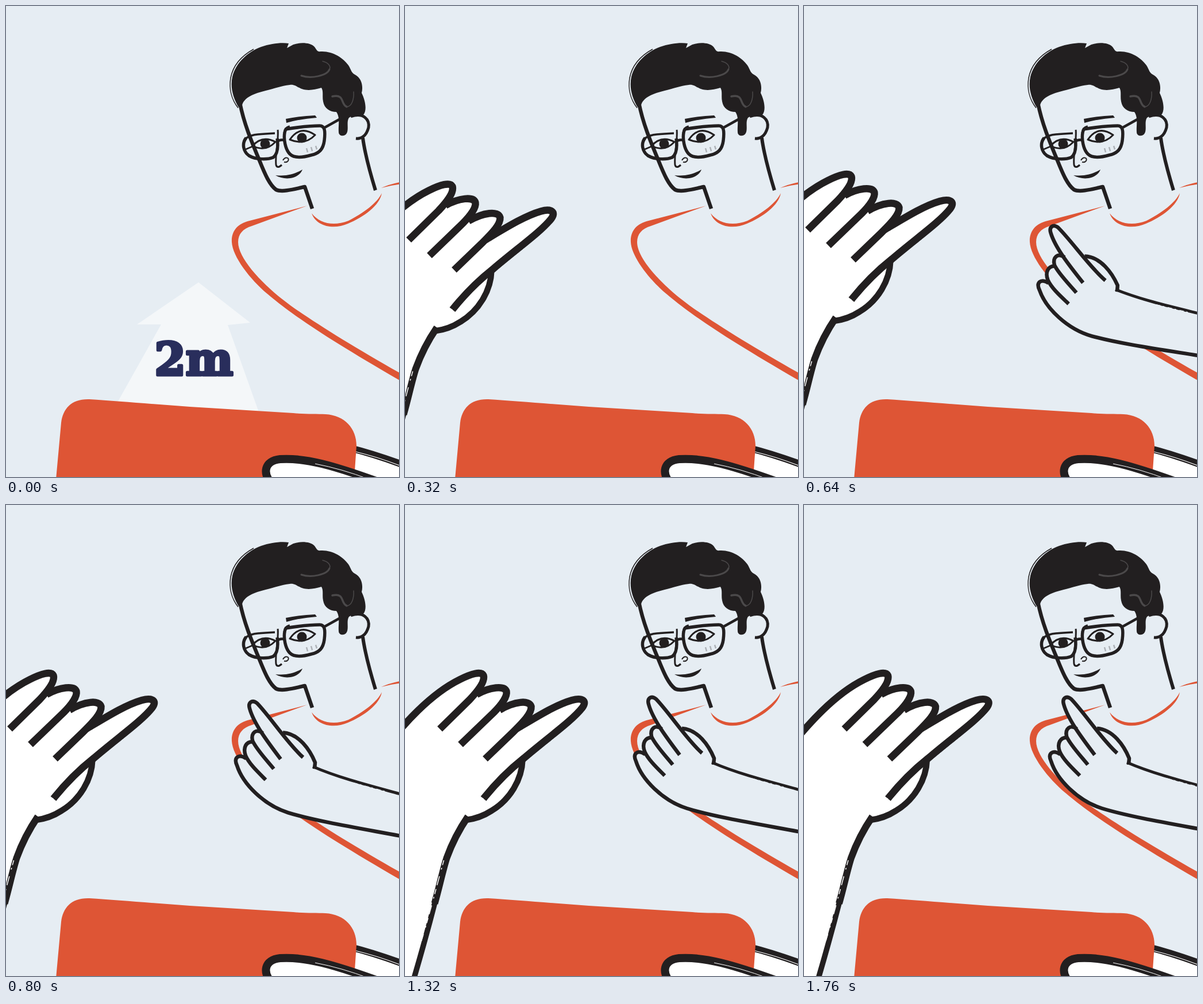
Recreate the animation shown at these times as an HTML page. Size 684 by 818 pixels, loop 1.8 s.

```html
<!DOCTYPE html>
<html lang="en">
<head>
<meta charset="utf-8">
<title>Keep two metres apart</title>
<style>
  html, body { margin: 0; width: 100%; height: 100%; overflow: hidden; background: #e6edf3; }
  svg { display: block; width: 100%; height: 100%; }
  .ink { fill: none; stroke: #221f20; stroke-linejoin: round; }
  .solid { fill: #221f20; }
  .red { fill: #de5535; }
  .skin { fill: #e6edf3; }
  .white { fill: #fff; }
  .fleck { fill: none; stroke: #fff; }
  .gray { fill: none; stroke: #4b494a; stroke-linecap: round; }
  .big { font: bold 78px "DejaVu Serif", serif; fill: #292e5c; stroke: #292e5c; stroke-width: 5; stroke-linejoin: round; }
</style>
</head>
<body>
<svg viewBox="0 0 684 818">
  <rect class="skin" width="684" height="818"/>

  <!-- shirt -->
  <g class="red">
    <path d="M524 347L420 374C400 380 392 394 393 410C394 435 425 475 455 500C500 538 560 578 690 653V640C610 595 540 552 495 520C450 487 404 440 404 410C404 396 412 387 428 382Z"/>
    <path d="M532 360C540 383 570 389 595 378C622 367 651 346 654 325C647 341 622 360 596 373C570 383 546 378 532 360Z"/>
    <path d="M653 316Q668 309 690 305V309Q670 311 653 316Z"/>
  </g>

  <!-- head -->
  <path class="ink" stroke-width="6.500" d="M407 168C414 204 428 237 441 268C451 293 459 311 470 319C480 324 502 318 520 314L533 352"/>
  <path class="ink" stroke-width="6" d="M621 229C624 252 632 284 643 320"/>
  <path class="skin" d="M598 194C624 184 633 201 631 212C627 228 617 233 609 230Z"/>
  <path class="ink" stroke-width="5" d="M600 192C623 184 633 198 631 211C627 226 618 231 609 230"/>
  <path class="solid" d="M405 176C395 159 390 141 394 123C400 99 420 80 444 71C461 65 480 63 492 65L489 73L500 67C512 63 529 63 537 71C541 76 541 80 548 79C568 78 587 90 596 103C601 111 601 116 607 119C619 125 622 139 619 151C625 163 629 181 622 189C615 194 605 188 597 194C592 201 597 214 593 221C589 228 579 226 579 219C578 209 582 194 575 184C564 184 554 178 552 166C550 157 553 148 549 142C537 145 527 148 515 144C506 141 503 136 494 137C478 139 469 143 452 147C432 152 415 158 411 172Z"/>
  <path class="ink" stroke-width="1.500" d="M404 177C392 162 388 143 391 125C395 104 409 87 431 75"/>
  <path class="gray" stroke-width="3" d="M514 121C531 127 559 121 563 110"/>
  <path class="gray" stroke-width="1.5" d="M563 110C566 104 560 98 551 96"/>
  <path class="gray" stroke-width="3.5" d="M568 157C590 152 582 171 593 175"/>
  <path class="gray" stroke-width="1.5" d="M593 175C602 175 606 161 605 149"/>

  <!-- face -->
  <path class="solid" d="M487 196Q512 191 538 190L541 194Q512 196 488 203Z"/>
  <g class="ink" stroke-width="5.500">
    <path d="M486 214C505 211 530 208 546 208C555 208 556 217 554 234C552 248 546 256 531 259C517 263 502 265 494 257C486 249 483 231 485 220Q486 212 494 210"/>
    <path d="M418 229C410 239 413 253 423 260C435 267 455 267 465 263C473 257 474 244 472 230"/>
    <path stroke-width="3.500" d="M417 230Q426 224 438 223T468 221"/>
    <path stroke-width="4.500" d="M471 236Q477 231 485 233M553 212L580 197"/>
    <path stroke-width="3" d="M473 215C475 232 468 257 470 276Q472 283 480 276"/>
    <path stroke-width="2" d="M482 268C486 261 494 263 491 269Q489 272 484 271"/>
    <path stroke-width="3" d="M494 232Q512 206 538 224Q520 243 494 232ZM429 243Q446 224 469 236Q452 254 429 243Z"/>
    <path stroke-width="2.5" d="M417 249L431 243"/>
  </g>
  <circle class="solid" cx="515" cy="229" r="8.5"/>
  <circle class="solid" cx="451" cy="239.500" r="8.500"/>
  <path class="solid" d="M469 294C489 296 503 292 516 284C510 300 486 304 469 294Z"/>
  <path fill="none" stroke="#aeb2b7" stroke-width="2.500" d="M523 247L525 254M531 245L533 252M539 243L541 249"/>

  <!-- distance sign -->
  <path id="arrow" class="white" d="M335 480L425 550L386 554L441 708L193 690L270 553H228Z"/>
  <g id="label"><text class="big" x="327" y="641" text-anchor="middle">2m</text></g>

  <!-- near hand -->
  <g id="near">
    <path class="white" d="M-200 700L-40 440C10 375 60 325 105 303C125 293 142 288 146 296C149 303 142 315 138 326C160 315 182 314 186 324C188 331 183 340 178 352C200 341 225 338 229 350C230 361 216 375 209 385C240 367 272 347 300 339C318 334 327 340 318 352C300 375 258 407 216 444C214 475 192 512 160 531Q140 543 118 545C106 562 91 588 82 613C70 653 50 735 25 822L0 900H-200Z"/>
    <g class="ink" stroke-width="12.500">
      <path d="M-60 466C10 371 60 325 105 303C125 293 142 288 146 296C149 306 137 322 122 338L70 389"/>
      <path d="M134 329C157 316 183 313 186 324C188 335 172 353 157 367L106 416"/>
      <path d="M174 356C200 341 226 338 229 350C230 362 215 377 198 394L149 441"/>
      <path d="M203 389C240 367 272 347 300 339C318 334 327 340 318 352C300 375 258 404 216 440Q178 470 146 510"/>
      <path stroke-width="10.500" d="M214 442C213 477 192 512 160 531Q140 544 116 547"/>
      <path stroke-width="12" d="M119 541C106 560 91 588 82 613C75 635 69 664 61 692"/>
      <path stroke-width="9.500" d="M62 688C52 727 40 771 25 822L5 890"/>
    </g>
    <path class="fleck" stroke-width="5" stroke-dasharray="5 2 9 3" d="M121 534Q136 527 145 507"/>
    <path class="fleck" stroke-width="1.500" stroke-dasharray="9 5 3 12 16 7" d="M77 617C65 660 52 712 38 757"/>
    <path fill="none" stroke="#e6edf3" stroke-width="1.500" stroke-dasharray="2 5 4 3" d="M220 454C218 482 198 515 167 534M226 441L274 402"/>
  </g>

  <!-- far hand -->
  <g id="far">
    <path class="skin" d="M900 545L684 494C640 482 580 465 539 449C537 425 515 388 482 389C466 370 449 349 437 337C428 330 421 336 424 346C429 363 437 373 443 387C434 382 427 389 429 403C418 404 413 414 417 432C405 424 396 431 402 445C412 477 449 514 491 527C540 542 620 555 684 567L900 605Z"/>
    <g class="ink" stroke-width="6.500">
      <path d="M517 431C490 407 461 362 437 337C428 330 421 336 424 346C431 372 456 405 478 434"/>
      <path d="M447 389C435 380 426 389 429 402C435 416 452 434 466 451"/>
      <path d="M430 404C418 403 412 414 417 428C423 442 438 456 452 470"/>
      <path d="M418 433C404 424 396 432 402 445C412 477 449 514 491 527C540 542 620 555 684 567L900 605"/>
      <path d="M482 388C510 390 529 418 538 440L537 451"/>
      <path stroke-width="5" d="M534 447C580 467 640 482 684 494L900 545"/>
    </g>
    <path fill="none" stroke="#e6edf3" stroke-width="1.200" stroke-dasharray="8 4 3 6" d="M604 475L660 490"/>
  </g>

  <!-- phone and fingers -->
  <path class="white" d="M600 770L690 796V830H600Z"/>
  <path class="ink" stroke-width="12" d="M600 768Q640 778 692 797"/>
  <path class="fleck" stroke-width="1.200" d="M608 774Q650 784 690 800"/>
  <path class="red" d="M87 822L96 724C99 699 114 682 145 683C195 686 260 692 320 696L500 707C520 709 540 708 556 709C590 711 610 734 610 764L606 822Z"/>
  <path class="white" d="M463 830C446 812 449 790 477 787C520 784 570 798 650 827Z"/>
  <path class="ink" stroke-width="14" d="M463 830C446 812 449 790 477 787C520 784 570 798 650 827"/>
  <path class="fleck" stroke-width="1" d="M538 795Q585 804 632 822"/>
</svg>
<script>
const LOOP = 1800, STEP = 40;
const el = id => document.getElementById(id);
const [arrow, label, near, far] = ["arrow", "label", "near", "far"].map(el);

const part = (t, a, b) => Math.min(1, Math.max(0, (t - a) / (b - a)));
const left = (t, a, b, power) => (1 - part(t, a, b)) ** power;
const inOut = (t, a, b) => {
  const p = part(t, a, b);
  return p < 0.5 ? 4 * p ** 3 : 1 - 4 * (1 - p) ** 3;
};

function pose(node, dx, dy, angle, px, py, shown) {
  node.setAttribute("transform", `translate(${dx} ${dy}) rotate(${angle} ${px} ${py})`);
  node.setAttribute("visibility", shown ? "visible" : "hidden");
}

function draw(t) {
  arrow.setAttribute("opacity", 0.56 * left(t, 0, 220, 1));
  label.setAttribute("opacity", left(t, 0, 152, 1));
  const size = 1 - 0.15 * part(t, 0, 120);
  label.setAttribute("transform", `translate(326 680) scale(${size}) translate(-326 -680)`);

  const swing = left(t, 0, 300, 2);
  pose(near, 63.5 * (inOut(t, 1160, 1400) - 1) - 83 * swing,
    380 * left(t, 0, 560, 3.64), -9.2 * swing, 118.5, 545, t > 60);

  const turn = left(t, 400, 720, 2);
  pose(far, 28 * inOut(t, 1520, 1760) + 128 * turn,
    55.5 * (1 - inOut(t, 460, 960)), -23 * turn, 538, 449, t >= 400);
}

const start = performance.now();
function tick() {
  const t = (performance.now() - start) % LOOP;
  draw(Math.floor(t / STEP) * STEP);
  requestAnimationFrame(tick);
}
tick();
</script>
</body>
</html>
```
